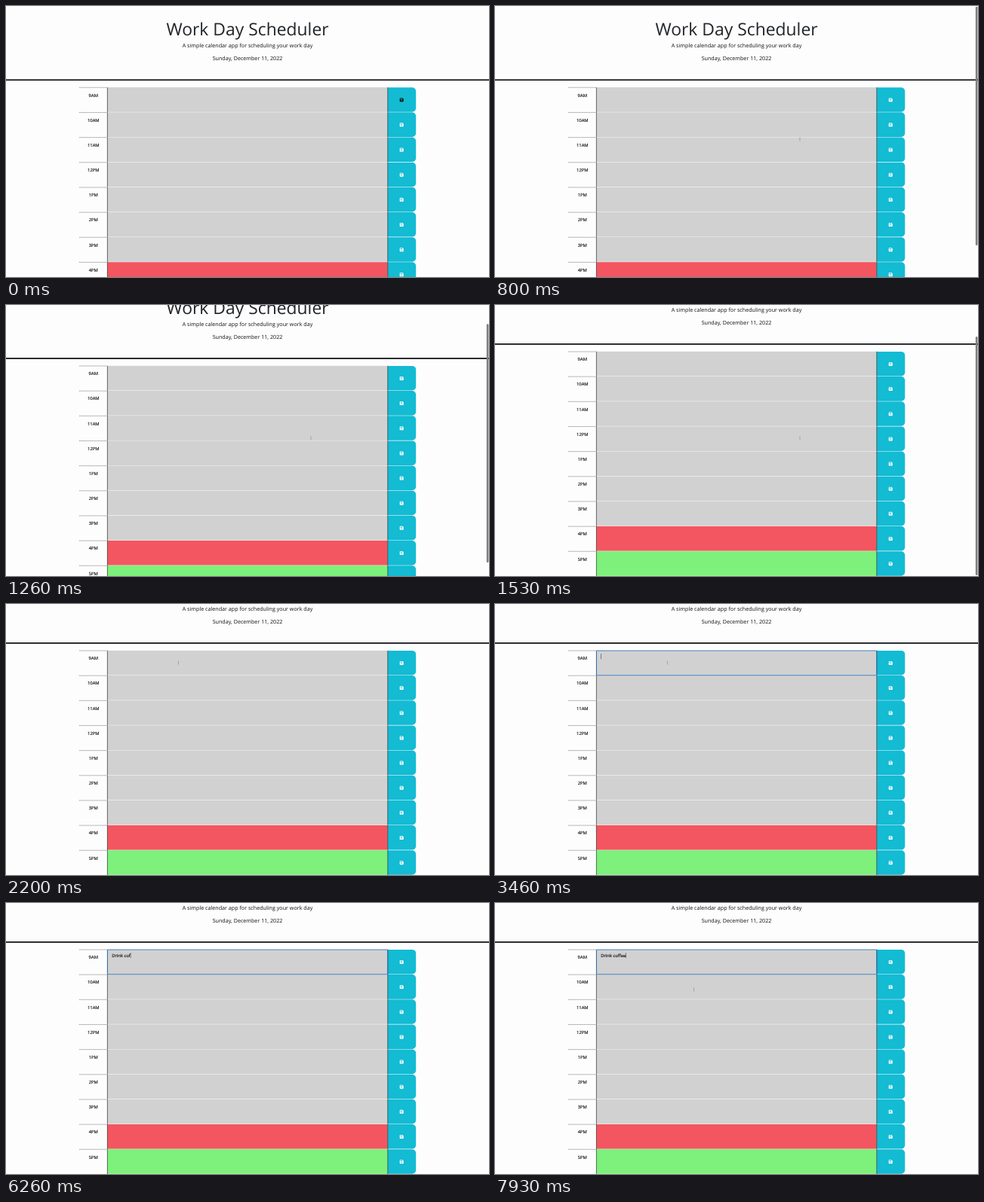
An HTML page that plays this animation: 640x360 px, repeating every 8000 ms.

```html
<!DOCTYPE html>
<html lang="en">
<head>
<meta charset="utf-8">
<title>Work Day Scheduler</title>
<style>
  html, body { margin: 0; width: 100%; height: 100%; overflow: hidden; background: #fdfdfd; }
  svg { display: block; width: 640px; height: 360px; }
  text { font-family: "Open Sans", sans-serif; font-size: 7.16px; fill: #111; text-rendering: geometricPrecision; white-space: pre; }
  .middle { text-anchor: middle; }
  .title { font-size: 22.9px; fill: #212529; }
  .small { font-size: 5.87px; fill: #000; stroke: #000; stroke-width: .12px; }
</style>
</head>
<body>
<svg viewBox="0 0 640 360">
  <g id="page">
    <text class="middle title" x="320" y="39.2">Work Day Scheduler</text>
    <text class="middle" x="320" y="55.4">A simple calendar app for scheduling your work day</text>
    <text class="middle" x="320" y="72.1">Sunday, December 11, 2022</text>
    <rect y="97.3" width="640" height="1.9" fill="#222429"/>
    <g id="rows"></g>
    <g id="field">
      <rect x="134.5" y="108.3" width="371.3" height="32.7" rx=".6" fill="none" stroke="#2a72c0" stroke-width=".85"/>
      <text id="entry" class="small" x="140.2" y="118.4"></text>
      <rect id="caret" y="112.4" width=".5" height="7" fill="#222"/>
    </g>
  </g>
  <rect id="thumb" x="636.8" width="2.7" height="317" rx="1.3" fill="#7d7d7d"/>
  <path id="pointer" d="M0-2.6V2.6" stroke="#888" stroke-width=".6"/>
</svg>
<script>
const $ = id => document.getElementById(id);
const LOOP = 8000, ROW_TOP = 108.1, ROW_HEIGHT = 33.16;
const FOCUS = 2730, BLINK_START = 2430, TYPING = 4200, RETURN = 7530;
const ENTRY = 'Drink coffee';

const disk = 'M.6 0H3.8L5 1.2V4.4Q5 5 4.4 5H.6Q0 5 0 4.4V.6Q0 0 .6 0Z' +
  'M.8 .8V1.8H3.4V.8ZM2.5 2.5A.75 .75 0 0 0 2.5 4A.75 .75 0 0 0 2.5 2.5Z';

function row(hour) {
  const color = hour < 16 ? '#d1d1d1' : hour === 16 ? '#f35660' : '#7df17b';
  const label = (hour > 12 ? hour - 12 : hour) + (hour < 12 ? 'AM' : 'PM');
  return `<g transform="translate(0 ${ROW_TOP + (hour - 9) * ROW_HEIGHT})">
    <path d="M97 .2H134" stroke="#444" stroke-width=".6" stroke-dasharray="1.2 .75"/>
    <text class="middle small" x="115.8" y="12.5">${label}</text>
    <rect x="134.2" width="371.6" height="32.7" fill="${color}"/>
    <path d="M505.8 .1H538.2a5 5 0 0 1 5 5V27.7a5 5 0 0 1 -5 5H505.8Z" fill="#13bbd3"/>
    <path d="M134.4 0V33.1M505.8 0V33.1" stroke="#333" stroke-width=".7"/>
    <path class="icon" transform="translate(521.7 14.1)" fill="#fff" fill-rule="evenodd" d="${disk}"/>
  </g>`;
}
for (let hour = 9; hour <= 17; hour++) $('rows').innerHTML += row(hour);
const firstIcon = document.querySelector('.icon');

const progress = (t, from, to) => Math.min(1, Math.max(0, (t - from) / (to - from)));
const mix = (a, b, k) => a.map((v, i) => v + (b[i] - v) * k);
const show = (id, visible) => $(id).setAttribute('visibility', visible ? 'visible' : 'hidden');

// Each word is typed at a steady pace with a pause in between.
const keyTime = i => i < 6 ? TYPING + 190 * i : 5660 + 220 * (i - 6);

function pointerAt(t) {
  const button = [524, 124], rest = [404, 177], field = [228.5, 78], end = [263.5, 115];
  return t < 2200 ? mix(button, rest, progress(t, 130, 730))
                  : mix(field, end, progress(t, RETURN - 60, 7930));
}

function draw(t) {
  const scroll = 46.3 * progress(t, 800, 1530) ** 1.15;
  $('page').setAttribute('transform', `translate(0 ${-scroll})`);
  $('thumb').setAttribute('y', 1 + scroll * 0.885);
  show('thumb', t >= 800 && t < 2200);

  const hovering = t < 200;
  firstIcon.setAttribute('fill', hovering ? '#111' : '#fff');
  $('pointer').setAttribute('transform', `translate(${pointerAt(t)})`);
  show('pointer', !hovering && (t < TYPING || t >= RETURN));

  let typed = 0;
  while (typed < ENTRY.length && keyTime(typed) <= t) typed++;
  const lastKey = typed ? keyTime(typed - 1) : BLINK_START;
  $('entry').textContent = ENTRY.slice(0, typed);
  $('caret').setAttribute('x', 140.2 + $('entry').getComputedTextLength());
  show('field', t >= FOCUS);
  show('caret', t >= FOCUS && (t - lastKey) % 1000 < 500);
}

const start = performance.now();
function frame() {
  draw((performance.now() - start) % LOOP);
  requestAnimationFrame(frame);
}
frame();
</script>
</body>
</html>
```
